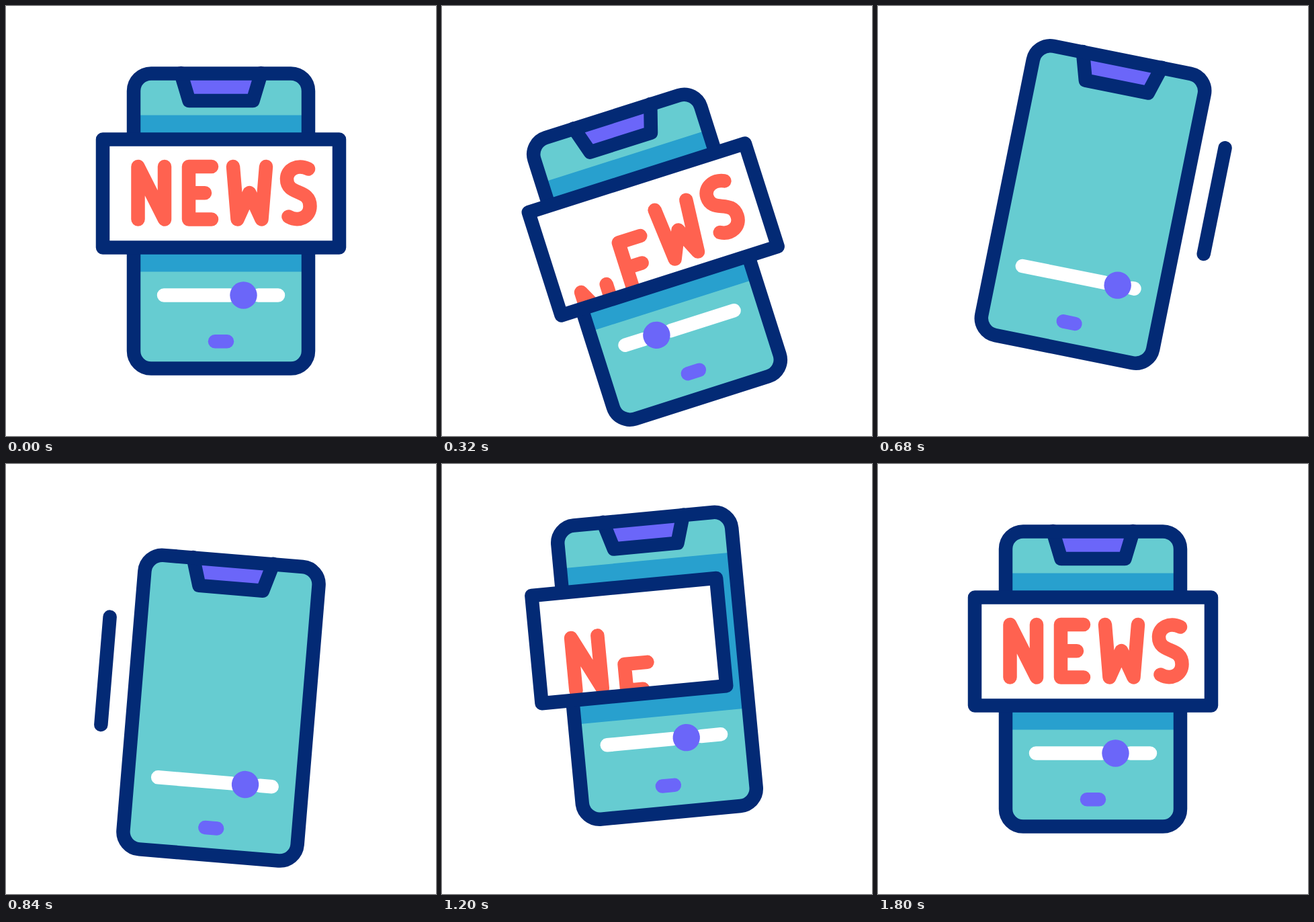
Write an HTML page that moves like this. It is 640 px wide and 640 px high and loops after 2040 ms.

```html
<!DOCTYPE html>
<html lang="en">
<head>
<meta charset="utf-8">
<title>News on a phone</title>
<style>
  html, body { margin: 0; width: 100%; height: 100%; overflow: hidden; background: #fff; }
  svg { display: block; width: 100%; height: 100%; }
  .line { fill: none; stroke-width: 20.5; stroke-linecap: round; stroke-linejoin: round; }
  .navy { stroke: #032a75; }
  .white { stroke: #fff; }
  .violet { stroke: #6b66f9; }
  .red { stroke: #ff6250; }
</style>
</head>
<body>
<svg viewBox="0 0 640 640">
  <defs>
    <clipPath id="screen"><rect x="190" y="100.5" width="260" height="439" rx="26"/></clipPath>
    <clipPath id="paper"><rect id="paperBox" y="199" width="352" height="160"/></clipPath>
  </defs>
  <g id="phone">
    <rect x="190" y="100.5" width="260" height="439" rx="26" fill="#66ccd1"/>
    <g clip-path="url(#screen)">
      <rect id="shade" y="162.5" height="233" fill="#28a0ce"/>
    </g>
    <path d="M260.2 100 L272.5 141 H367.5 L379.8 100 Z" fill="#6b66f9"/>
    <path class="line navy" d="M260.2 100 L272.5 141 H367.5 L379.8 100"/>
    <rect class="line navy" x="190" y="100.5" width="260" height="439" rx="26"/>
    <path id="track" class="line white"/>
    <circle id="knob" cy="430.5" r="20.2" fill="#6b66f9"/>
    <path class="line violet" d="M311 499.2 H329"/>
    <rect id="sheet" y="198.5" height="161" fill="#fff"/>
    <g clip-path="url(#paper)">
      <path class="line red letter" d="M196.5 317.5 V239 L236 317.5 V239"/>
      <path class="line red letter" d="M306 239 H272 V317.5 H306 M272 278.2 H296"/>
      <path class="line red letter" d="M338 239 L344.5 317.5 L362.3 278 L380.5 317.5 L387 239"/>
      <path class="line red letter" d="M450 242.5 C434 235 418 243 418 257.5 C418 283 452.5 271 452.5 298 C452.5 314 436 322 420.5 313.5"/>
    </g>
    <path id="frame" class="line navy"/>
  </g>
</svg>
<script>
const LOOP = 2040, STEP = 20, SWAP = 800;
const LEFT = 144, RIGHT = 496, SHADE_EXTRA = 28;
const SINK = 140, SINK_TIME = 300;
const sinkAt = [131, 209, 263, 320];
const riseAt = [986, 1056, 1132, 1205];

const tilt = curve([[0, 0], [330, -17.7], [540, 4.5], [625, 12.9], [680, 11.4], [1020, -3.6],
  [1110, -7.2], [1200, -5.4], [1455, 4.2], [1520, 3.47], [1640, 1.8], [1800, 0]]);
const height = curve([[0, 320], [310, 374], [540, 303], [625, 290], [680, 295.5], [900, 376],
  [1020, 351.4], [1200, 300.3], [1215, 299], [1520, 334.8], [1560, 337.5], [1800, 320]]);
const slide = curve([[0, 353.5], [330, 284], [680, 379.7], [980, 353.5]]);

const $ = id => document.getElementById(id);
const letters = document.querySelectorAll(".letter");

function ease(t, start, length) {
  const p = Math.min(1, Math.max(0, (t - start) / length));
  return p * p * (3 - 2 * p);
}

// Smooth curve through the points, level at every peak and at both ends.
function curve(points) {
  const rise = points.slice(1).map((p, i) => (p[1] - points[i][1]) / (p[0] - points[i][0]));
  const slope = points.map((_, i) => {
    const a = rise[i - 1], b = rise[i];
    return a * b > 0 ? 2 * a * b / (a + b) : 0;
  });
  return t => {
    const last = points.length - 1;
    if (t >= points[last][0]) return points[last][1];
    let i = 0;
    while (t >= points[i + 1][0]) i++;
    const [x0, y0] = points[i], [x1, y1] = points[i + 1];
    const w = x1 - x0, u = (t - x0) / w, v = 1 - u;
    return y0 * v * v * (1 + 2 * u) + y1 * u * u * (3 - 2 * u)
      + w * u * v * (slope[i] * v - slope[i + 1] * u);
  };
}

function span(el, from, to) {
  el.setAttribute("x", from);
  el.setAttribute("width", Math.max(0, to - from));
}

function draw(t) {
  $("phone").setAttribute("transform",
    `translate(320 ${height(t)}) rotate(${tilt(t)}) translate(-320 -320)`);

  const k = slide(t);
  $("knob").setAttribute("cx", k);
  $("track").setAttribute("d", `M235 430.5 H${k - 20} M${Math.min(405, k + 22)} 430.5 H405`);

  // The banner shuts towards the right, then opens again from the left.
  const full = RIGHT - LEFT, closing = t < SWAP;
  const p = closing ? ease(t, 272, 400) : ease(t, 920, 400);
  const from = closing ? LEFT + full * p : LEFT;
  const to = closing ? RIGHT : LEFT + full * p;
  const reach = (full + SHADE_EXTRA) * p;
  if (closing) span($("shade"), LEFT - SHADE_EXTRA + reach, RIGHT);
  else span($("shade"), LEFT, LEFT + reach);
  span($("sheet"), from, to);
  span($("paperBox"), from, to);
  $("frame").setAttribute("d", `M${from} 198.5 H${to} V359.5 H${from} Z`);

  letters.forEach((el, i) => {
    const down = closing ? ease(t, sinkAt[i], SINK_TIME) : 1 - ease(t, riseAt[i], SINK_TIME);
    el.setAttribute("transform", `translate(0 ${SINK * down})`);
  });
}

const began = performance.now();
function tick() {
  const t = (performance.now() - began) % LOOP;
  draw(Math.floor(t / STEP) * STEP);
  requestAnimationFrame(tick);
}
tick();
</script>
</body>
</html>
```
